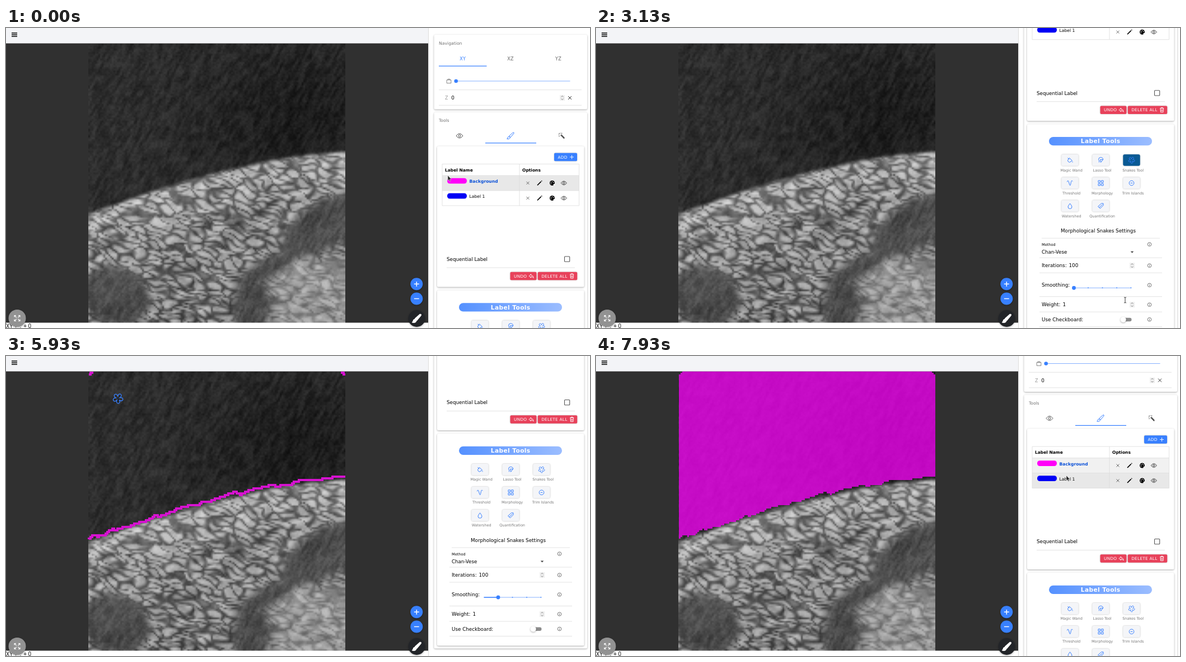
An HTML page with a canvas that plays this animation: 1043x537 px, repeating every 8000 ms.

```html
<!DOCTYPE html>
<html lang="en">
<head>
<meta charset="utf-8">
<title>Segmentation tool</title>
<style>
html, body { margin: 0; width: 100%; height: 100%; overflow: hidden; background: #303030 }
canvas, svg { position: absolute; left: 0; top: 0 }
#scan { left: 147.3px; top: 27.5px; width: 459px; height: 500px }
text { font-family: "DejaVu Sans", sans-serif; white-space: pre }
.status { font-family: Roboto, sans-serif }
.card { filter: drop-shadow(0 1px 1.5px #0005) }
.key { filter: drop-shadow(0 .8px .8px #0004) }
</style>
</head>
<body>
<canvas id="scan" width="153" height="167"></canvas>
<svg id="ui" width="1043" height="537"></svg>
<script>
const BLUE = '#3880ff', PALE = '#86b1ff', RED = '#e8415a', LINE = '#dcdcdc';
const $ = id => document.getElementById(id);
const clamp = v => Math.min(1, Math.max(0, v));
const mix = (a, b, k) => a + (b - a) * k;
const smooth = (a, b, v) => { const k = clamp((v - a) / (b - a)); return k * k * (3 - 2 * k); };

// ---- Scan ----
const surface = x => 220 + 112 * clamp((606 - x) / 459) ** 1.55;

const hash = (x, y) => { const s = Math.sin(x * 127.1 + y * 311.7) * 43758.5453; return s - Math.floor(s); };
function noise(x, y) {
  const i = Math.floor(x), j = Math.floor(y), u = smooth(0, 1, x - i), v = smooth(0, 1, y - j);
  return mix(mix(hash(i, j), hash(i + 1, j), u), mix(hash(i, j + 1), hash(i + 1, j + 1), u), v);
}
// Difference of the two nearest seed distances: 0 on a crack.
function cellGap(x, y) {
  let near = 9, next = 9;
  const ci = Math.floor(x), cj = Math.floor(y);
  for (let i = ci - 1; i <= ci + 1; i++) for (let j = cj - 1; j <= cj + 1; j++) {
    const d = Math.hypot(i + hash(i, j) - x, j + hash(j + 50, i) - y);
    if (d < near) { next = near; near = d; } else if (d < next) next = d;
  }
  return next - near;
}

function paintScan() {
  const c = $('scan').getContext('2d', { willReadFrequently: true }), W = 153, H = 167;
  const hollow = (...ellipse) => { c.beginPath(); c.ellipse(...ellipse, 0, 7); c.fill(); };
  c.filter = 'blur(2px)';
  c.setTransform(1 / 3, 0, 0, 1 / 3, -49, -9);
  hollow(575, 350, 92, 42, -.5);
  hollow(468, 430, 62, 17, -.5);
  hollow(438, 500, 34, 50, .1);
  hollow(195, 480, 62, 52, .4);
  const img = c.getImageData(0, 0, W, H), px = img.data;
  for (let j = 0; j < H; j++) for (let i = 0; i < W; i++) {
    const x = 148.5 + 3 * i, y = 29 + 3 * j, k = 4 * (j * W + i);
    const depth = y - surface(x);
    const grain = (noise((x + y * .5) / 5, y / 13) - .5) * 24 + (hash(x, y) - .5) * 13;
    const air = 45 - 17 * Math.exp(-((x - 520) ** 2 / 25000 + (y - 160) ** 2 / 15000)) + grain;
    const wx = x + 20 * noise(x / 26, y / 16), wy = y + 14 * noise(x / 22 + 9, y / 18);
    const gap = cellGap((wx * .95 + wy * .31) / 31, (wy * .95 - wx * .31) / 11);
    const crack = 1 - smooth(0, .2 + .5 * noise(x / 16 + 40, y / 11), gap);
    const contrast = 88 - 48 * smooth(440, 500, x) * smooth(380, 430, y);
    let tissue = 163 - contrast * crack + 38 * Math.exp(-Math.max(depth, 0) / 55)
      + (noise(x / 13, y / 7) - .5) * 52 + grain * .7;
    tissue = mix(tissue, 76 + grain * 1.3 + 16 * (noise(x / 30, y / 30) - .5), px[k + 3] / 255);
    px[k] = px[k + 1] = px[k + 2] = mix(air, tissue, smooth(-4, 8, depth));
    px[k + 3] = 255;
  }
  c.putImageData(img, 0, 0);
}

// ---- Drawing helpers ----
const rect = (x, y, w, h, fill, r = 0, extra = '') =>
  `<rect x="${x}" y="${y}" width="${w}" height="${h}" rx="${r}" fill="${fill}" ${extra}/>`;
const card = (x, y, w, h) => rect(x, y, w, h, '#fff', 2.5, 'class="card"');
const circle = (x, y, r, fill, extra = '') => `<circle cx="${x}" cy="${y}" r="${r}" fill="${fill}" ${extra}/>`;
const text = (x, y, s, size = 8.75, fill = '#000', extra = '') =>
  `<text x="${x}" y="${y}" font-size="${size}" fill="${fill}" ${extra}>${s}</text>`;
const line = (x1, x2, y, color = LINE, w = .8) => `<path d="M${x1} ${y}H${x2}" stroke="${color}" stroke-width="${w}"/>`;
const icon = (x, y, d, color = '#333', w = 1, fill = 'none', scale = 1) =>
  `<path transform="translate(${x} ${y}) scale(${scale})" d="${d}" fill="${fill}" stroke="${color}" stroke-width="${w}" stroke-linejoin="round"/>`;
const MID = 'text-anchor="middle"', BOLD = 'font-weight="bold"', CAPS = 'letter-spacing=".3"';

// Splat outline with five rounded arms.
function splat(size) {
  const points = [];
  for (let a = 0; a < 6.28; a += .08) {
    const r = size * (.68 + .32 * Math.cos(5 * a)), turn = a + .17 * Math.sin(5 * a) + .25;
    points.push((r * Math.cos(turn)).toFixed(1) + ' ' + (r * Math.sin(turn)).toFixed(1));
  }
  return 'M' + points.join('L') + 'Z';
}
const ring = r => `M${r} 0A${r} ${r} 0 1 1-${r} 0A${r} ${r} 0 1 1 ${r} 0`;
const eye = 'M-6 0Q0-8 6 0Q0 8-6 0' + ring(2);
const brush = 'M4.6-6Q6.8-6.3 6-4.4L.2 2.6-2.4.3ZM-2.8 1.3Q-5 1.5-5 4L-6.3 5.5Q-1.5 6.5-.6 3.2Z';
const cross = 'M-3-3 3 3M3-3-3 3', plus = 'M-3.5 0H3.5M0-3.5V3.5';
const undo = 'M-.5-3.5-4 0-.5 3V1Q3 1 4 3.5 4-1.5-.5-1.5Z';
const trash = 'M-3.5-3H3.5M-1.5-3V-4.2H1.5V-3M-2.8-2.8-2.3 4H2.3L2.8-2.8M-1-1V2.5M1-1V2.5';
const wand = 'M-1.5-1.5 5 5M-.3-2.3 5.5 3.8M-4.5-4.5l1 1M-2-5.3v1M-5-2h1M1-5l-1 1M-4.5 1l1-1';
const corner = 'M-5-2V-5H-2M-5-5-1.2-1.2';
const tools = [
  ['Magic Wand', 'M-1-4 4 1-1 4Q-4 3-4 0ZM-4-4-1-1M4.5 2.5V4'],
  ['Lasso Tool', 'M-3 4Q-2 1-4-1-4-5 0-5 5-4 4-.5M-1-1H4L0 4Z'],
  ['Snakes Tool', splat(5.6)],
  ['Threshold', 'M-5-2Q-4-6-2.5-3L-.8 3Q.5 6 1.2 2L2-2Q3-6 4.8-3'],
  ['Morphology', 'M-4.5-4.5h3.5v3.5h-3.5zM1-4.5h3.5v3.5h-3.5zM-4.5 1h3.5v3.5h-3.5zM1 1h3.5v3.5h-3.5z'],
  ['Trim Islands', ring(4.3) + 'M-2 0H2'],
  ['Watershed', 'M0-4.5Q3.5 0 3.5 1.5A3.5 3.5 0 0 1-3.5 1.5Q-3.5 0 0-4.5'],
  ['Quantification', 'M-5 1 1-4.5 4.5-4.5 4.5-1-1 4.5ZM-3 3 3-2.5']
];

const spinner = (x, y) => rect(x - 4.5, y - 5, 9, 10, '#efefef') + icon(x, y, 'M-2-1.5 0-3.5 2-1.5M-2 1.5 0 3.5 2 1.5', '#666', .8);
const button = (x, y, w, color, label, d) => rect(x, y, w, 14.4, color, 2, 'class="key"')
  + text(x + 6.5, y + 9.7, label, 7.3, '#fff', CAPS) + icon(x + w - 9.5, y + 7.2, d, '#fff', .9);

function palette(x, y) {
  let s = circle(x, y, 4.5, '#000') + circle(x + 3.6, y + 3, 1.6, '#fff');
  for (let a = 2.6; a < 6.2; a += 1.1) s += circle(x + 2.5 * Math.cos(a), y + 2.5 * Math.sin(a), .8, '#fff');
  return s;
}
const labelRow = (id, y, color, name, style) => rect(779, y, 244.5, 27, '#fff', 0, `id="${id}"`)
  + rect(788, y + 4.7, 35, 9.8, color, 4.5) + text(827.5, y + 13, name, 7.6, ...style)
  + icon(932, y + 13.5, cross, '#444', .9, 'none', .85)
  + icon(953, y + 13.5, 'M-4 4 2.6-2.6M3.4-3.4 4.2-4.2', '#000', 1.7)
  + palette(975.5, y + 13.5) + icon(996.3, y + 13.5, eye, '#222', 1, 'none', .85);

const navigation = () => card(764.5, 12, 273.5, 133.5)
  + text(773, 30.3, 'Navigation', 7.7, '#737373')
  + ['XY', 'XZ', 'YZ'].map((s, i) => text(815.7 + 85.4 * i, 58, s, 8, i ? '#666' : BLUE, MID + CAPS)).join('')
  + line(773, 858.5, 68, BLUE, 1.25)
  + icon(791, 95.5, 'M-3.8-2.5H3.8V3.3H-3.8ZM-2-2.5V-4H2V-2.5', '#777', .9)
  + line(804, 1007.5, 95, PALE, 1.1) + circle(803.7, 95, 3.3, BLUE)
  + line(773, 1028, 110.7) + line(773, 1028, 138.3)
  + text(784, 128, 'Z', 8, '#999') + text(795.3, 128.3, '0') + spinner(993.5, 125) + icon(1007, 125, cross);

const labels = () => text(773, 168, 'Tools', 7.5, '#737373')
  + icon(810, 193, eye, '#555') + icon(901, 193, brush, BLUE) + icon(992, 193, wand, '#444', 1.1)
  + line(856, 947, 205.9, BLUE, 1.25)
  + card(770, 211.5, 262.5, 252)
  + button(979, 223.8, 41, BLUE, 'ADD', plus)
  + labelRow('row0', 264, '#ff00f8', 'Background', ['#0a50d8', BOLD]) + labelRow('row1', 291, '#0000f5', 'Label 1', [])
  + text(784, 256.7, 'Label Name', 7.5, '#000', BOLD) + text(922, 256.7, 'Options', 7.5, '#000', BOLD)
  + `<path d="M779 243.5H1023.5V318H779ZM779 264H1023.5M779 291H1023.5M917 243.5V318" fill="none" stroke="${LINE}" stroke-width=".8"/>`
  + rect(782, 398.5, 238.5, 29, '#f4f4f4', 2, 'id="seqHover"')
  + text(787, 416.8, 'Sequential Label') + rect(997.5, 409, 9.2, 9.2, '#fff', 1, 'stroke="#555" stroke-width="1.1"')
  + line(787, 1016, 429)
  + button(900.5, 436.8, 47, RED, 'UNDO', undo) + button(949.7, 436.8, 70.5, RED, 'DELETE ALL', trash);

const labelTools = () => card(770, 469.5, 262.5, 379.5)
  + rect(809, 492.3, 184, 15.3, 'url(#pill)', 7.6) + text(901.2, 503.7, 'Label Tools', 10.6, '#fff', BOLD + MID + ' letter-spacing=".4"')
  + tools.map(([name, d], i) => {
    const x = 846.5 + 55 * (i % 3), y = 533.8 + 41 * Math.floor(i / 3);
    return rect(x - 15.2, y - 10.3, 30.4, 20.4, '#f4f5f8', 3, `class="key" id="key${i}"`)
      + icon(x, y, d, BLUE) + text(x + 2.6, y + 20, name, 6.5, '#777', MID);
  }).join('');

// One settings line: label, optional stepper value, info mark and rule below.
const info = y => icon(988.5, y, ring(3.3) + 'M0-.5V2M0-2V-1.2', '#555', .8);
const setting = (y, label, value, gap = 13) => text(796, y + 3.1, label) + info(y) + line(792, 1011, y + gap)
  + (value ? text(value === '1' ? 833.5 : 844.5, y + 3.1, value) + spinner(957.5, y) : '');
const settings = () => '<g id="settings">'
  + text(897, 663, 'Morphological Snakes Settings', 8.75, '#000', MID) + line(796, 1007, 673.5)
  + text(796, 687.5, 'Method', 6.56) + text(796, 701, 'Chan-Vese', 8.65) + info(684.5) + line(792, 1011, 708.5)
  + '<path d="M954.7 697H960.3L957.5 700Z" fill="#444"/>'
  + setting(722.5, 'Iterations:', '100') + setting(757.5, 'Smoothing:', '', 20.5)
  + setting(792.5, 'Weight:', '1') + setting(819, 'Use Checkboard:')
  + line(853.5, 956, 762.5, PALE, 1) + [1, 2, 3, 4].map(i => circle(853.5 + 25.5 * i, 762.3, .9, BLUE)).join('')
  + rect(853.5, 761.8, 0, 1.4, BLUE, 0, 'id="smoothBar"') + circle(853.5, 762.5, 3.4, BLUE, 'id="smoothKnob"')
  + rect(938, 816, 18.5, 6.4, '#8c8c8c', 3.2) + circle(941.7, 819.2, 5, '#fff', 'class="card"') + '</g>';

// ---- Segmentation result: a pixel staircase just above the surface ----
let steps = '';
for (let x = 148; x < 606; x += 3) {
  const y = surface(x) - 3.5 + 7 * (noise(x / 11, 3) - .5);
  steps += `V${27 + 3 * Math.round((y - 27) / 3)}H${Math.min(x + 3, 606)}`;
}
const region = `<path id="contour" d="M148 328${steps}M148 33H151V30H154V28M600 28V30H603V33H606" fill="none" stroke="#d612d0" stroke-width="4"/>`
  + `<path id="fill" d="M148 33${steps}V33H603V30H600V27.5H154V30H151V33Z" fill="#f0f" opacity=".73"/>`;

const fab = (x, y, r, color, d, scale = 1, fill = 'none') => circle(x, y, r, color, 'class="card"') + icon(x, y, d, '#fff', 1.15, fill, scale);
const viewer = () => rect(0, 0, 754, 27.5, '#f3f4f7') + icon(15, 12, 'M-5-3H5M-5 0H5M-5 3H5', '#000', 1.3)
  + rect(0, 527.5, 754, 10, '#fff') + text(0, 537.3, "XY + ':' + 0", 10, '#222', 'class="status"')
  + fab(733.3, 458.3, 11, BLUE, plus, 1.25) + fab(733.3, 484.5, 11, BLUE, 'M-3.5 0H3.5', 1.25)
  + fab(733.5, 520, 15, '#222428', brush, 1.25, '#fff')
  + circle(20, 519.5, 15.5, '#929292', 'class="card"')
  + [0, 90, 180, 270].map(a => `<g transform="rotate(${a} 20 519.5)">${icon(20, 519.5, corner, '#fff', 1.1)}</g>`).join('');

$('ui').innerHTML = '<defs><linearGradient id="pill"><stop stop-color="#5591ff"/><stop offset="1" stop-color="#9bbdff"/></linearGradient></defs>'
  + region + viewer() + rect(754, 0, 289, 537, '#fff') + '<path d="M754.5 0V537" stroke="#ddd"/>'
  + '<g id="panel">' + navigation() + card(764.5, 151, 273.5, 703)
  + labels() + labelTools() + settings() + '</g><path id="cursor"/>';
paintScan();

// ---- Motion: each move is [start, end, ...target], eased out ----
const CLICK_TOOL = 2700, CLICK_SLIDER = 3850, CLICK_SEED = 5330, ACCEPT = 7070;
const pointer = [[330, 530, 400, 180], [870, 1600, 972, 501], [2530, CLICK_TOOL, 956, 474], [2860, 3130, 945, 487],
  [3400, CLICK_SLIDER, 879, 433], [4270, 4870, 486, 171], [5070, 5200, 496, 170], [5400, 5870, 200, 76],
  [5930, 6730, 182, 46], [7000, 7470, 828, 223], [7800, 7930, 840, 214]];
const scroll = [[1250, 1600, 62.5], [2765, 3330, 330.5], [7270, 7617, 110], [7800, 7930, 81.5]];
const follow = (moves, t, from) => moves.reduce((pos, [start, end, ...to]) => {
  const k = 1 - (1 - clamp((t - start) / (end - start))) ** 2;
  return pos.map((v, i) => mix(v, to[i], k));
}, from);

const shapes = {
  arrow: ['M0 0V9.2L2.1 7.3 3.7 10.6 5 10 3.6 6.8H6.4Z', '#222', '#fff', .5],
  hand: ['M-1.5-4.5V1L-3.7-.5-4 .6-1.5 4H3.5L4.5-1-.3-2V-4.5Z', '#222', '#fff', .4],
  beam: ['M-2-5Q0-5 0-4 0-5 2-5M0-4V4M-2 5Q0 5 0 4 0 5 2 5', 'none', '#333', 1],
  splat: [splat(9), 'none', BLUE, 1.3]
};
const set = (id, attrs) => { for (const k in attrs) $(id).setAttribute(k, attrs[k]); };
const show = (id, on) => set(id, { visibility: on ? 'visible' : 'hidden' });
const within = (v, a, b) => v >= a && v < b;

function render(t) {
  const [x, y] = follow(pointer, t, [789, 264]), [top] = follow(scroll, t, [0]);
  const kind = t > 4270 && x < 754 ? 'splat'
    : within(t, 2560, 2900) || within(t, 3700, 4400) || within(t, 7270, 7600) ? 'hand'
    : within(t, 2900, 3600) ? 'beam' : 'arrow';
  const [d, fill, stroke, width] = shapes[kind];
  set('cursor', { d, fill, stroke, 'stroke-width': width, transform: `translate(${x} ${y})` });
  set('panel', { transform: `translate(0 ${-top})` });

  ['row0', 'row1'].forEach((id, i) => {
    const over = kind === 'arrow' && within(x, 779, 1023) && within(y + top, 264 + 27 * i, 291 + 27 * i);
    set(id, { fill: over ? '#e8e8e8' : i ? '#fff' : '#f1f1f1' });
  });
  show('seqHover', within(t, 7350, 7540));
  show('settings', t >= CLICK_TOOL);
  set('key2', { fill: within(t, CLICK_TOOL, CLICK_SLIDER) ? '#0a5a94' : '#f4f5f8' });
  const knob = t < CLICK_SLIDER ? 0 : 25.5;
  set('smoothBar', { width: knob });
  set('smoothKnob', { cx: 853.5 + knob });
  show('contour', within(t, CLICK_SEED, ACCEPT));
  show('fill', t >= ACCEPT);
}

const start = performance.now();
function tick() {
  render((performance.now() - start) % 8000);
  requestAnimationFrame(tick);
}
tick();
</script>
</body>
</html>
```
